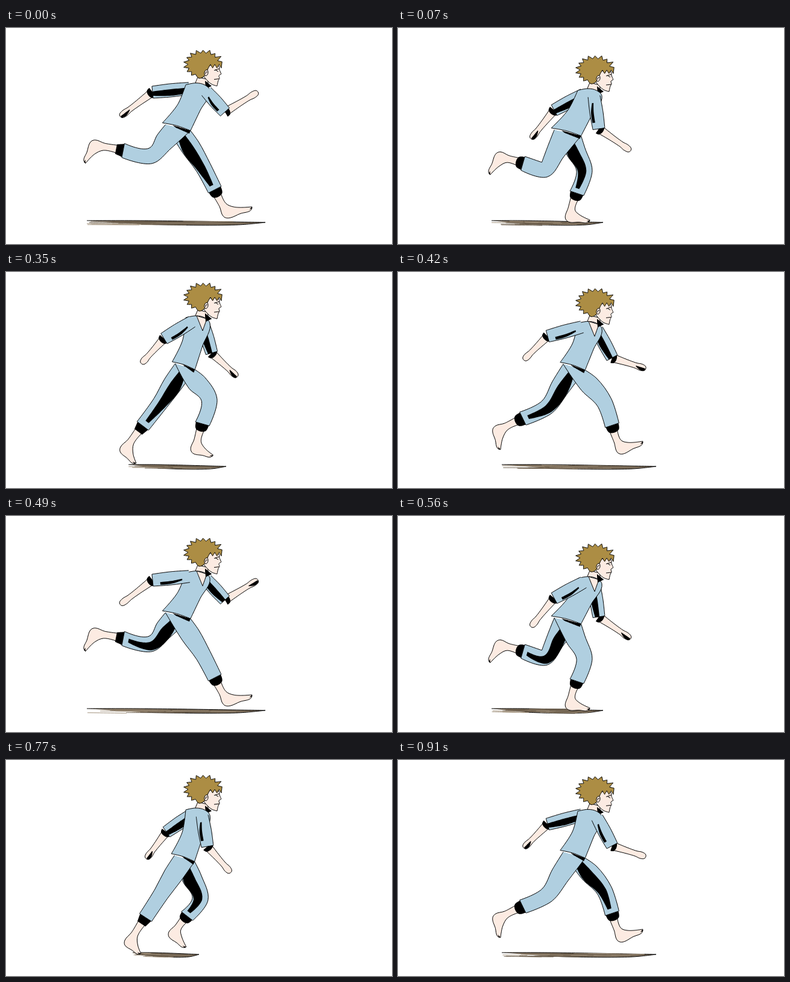
Recreate the animation shown at these times as an HTML page with a canvas. Size 640 px wide and 360 px high, loop 0.98 s.

```html
<!DOCTYPE html>
<html lang="en">
<head>
<meta charset="utf-8">
<title>Run cycle</title>
<style>
html, body { margin: 0; height: 100%; overflow: hidden; background: #fff; }
canvas { display: block; }
</style>
</head>
<body>
<canvas id="stage" width="640" height="360"></canvas>
<script>
const ctx = document.getElementById('stage').getContext('2d');
const CLOTH = '#b0cfe0', SKIN = '#fcebe2', HAIR = '#ac8d44', INK = '#000';
const STEP = 70, CYCLE = 14, HALF = 7;

const points = s => s.split(' ').map(p => p.split(',').map(Number));
const mix = (p, q, k = 0.5) => [p[0] + (q[0] - p[0]) * k, p[1] + (q[1] - p[1]) * k];
const add = (p, x, y) => [p[0] + x, p[1] + y];
const unit = (p, q) => {
  const d = Math.hypot(q[0] - p[0], q[1] - p[1]) || 1;
  return [(q[0] - p[0]) / d, (q[1] - p[1]) / d];
};
const randomizer = seed => () => (seed = (seed * 16807 + 11) % 2147483647) / 2147483647;

// Joint paths of one limb; the passing steps 2 and 9 lie between their neighbours
const joints = {
  knee: points('240,213 243,236 315,238 322,232 337,213 342,217 327,232 309,238 305,235 258,222 256,218 247,225'),
  ankle: points('152,196 174,216 257,274 280,286 315,290 367,291 364,304 285,310 284,308 207,300 200,292 170,262'),
  toe: points('131,225 152,244 265,305 298,312 343,306 406,283 408,299 318,321 310,321 223,323 215,319 169,296'),
  elbow: points('363,140 333,168 266,140 266,120 262,111 248,107 243,107 259,137 317,160 334,144 341,135 355,143'),
  hand: points('417,107 385,204 244,195 233,164 225,152 209,146 190,147 221,184 354,192 372,187 383,174 410,161')
};

function joint(name, phase) {
  const t = phase % CYCLE;
  if (t % HALF === 2) return mix(joint(name, t - 1), joint(name, t + 1));
  return joints[name][t - (t > 2) - (t > 9)];
}

// The head rises for four steps and drops for three
function headHeight(t) {
  return t >= 1 && t <= 5 ? 16 - 7 * t : -19 + 28 / 3 * ((t + 2) % HALF);
}

function torso(step) {
  const t = step % HALF;
  const wave = peak => Math.cos(2 * Math.PI * (t - peak) / HALF);
  const hipY = 172.5 + 10.5 * wave(1.9), lean = wave(4.65);
  return { top: headHeight(t), back: [265 + 11 * lean, hipY - 13], front: [308.5 + 5 * lean, hipY] };
}

// Points beside a chain of joints; side 1 is the back, -1 the front
const beside = (chain, widths, side) => chain.map((p, i) => {
  const d = unit(chain[i - 1] || p, chain[i + 1] || p), w = widths[i] * side;
  return [p[0] - d[1] * w, p[1] + d[0] * w];
});
const tube = (chain, widths, a = 1, b = -1) =>
  [...beside(chain, widths, a), ...beside(chain, widths, b).reverse()];

// Smooth line through the points that keeps sharp corners
function trace(poly) {
  const path = new Path2D();
  const tangents = poly.map((p, i) => {
    if (!i || i === poly.length - 1) return [0, 0];
    const u = unit(poly[i - 1], p), v = unit(p, poly[i + 1]);
    return u[0] * v[0] + u[1] * v[1] < 0.25 ? [0, 0] : unit([0, 0], add(u, ...v));
  });
  path.moveTo(...poly[0]);
  for (let i = 1; i < poly.length; i++) {
    const p = poly[i - 1], q = poly[i], s = tangents[i - 1], t = tangents[i];
    const k = Math.hypot(q[0] - p[0], q[1] - p[1]) / 3;
    path.bezierCurveTo(p[0] + s[0] * k, p[1] + s[1] * k, q[0] - t[0] * k, q[1] - t[1] * k, ...q);
  }
  return path;
}

function shape(poly, color, closed) {
  const path = trace(closed ? [...poly, poly[0]] : poly);
  ctx.fillStyle = color;
  ctx.fill(path);
  if (color !== INK) ctx.stroke(path);
}

// Black on the side of a limb that faces the body
function shade(chain, widths, reach) {
  const side = chain.at(-1)[0] > chain[0][0] ? 1 : -1;
  shape(tube(chain, widths, side, side * reach), INK);
}

function drawArm(phase, body, far) {
  const elbow = joint('elbow', phase), hand = joint('hand', phase);
  const swing = (elbow[0] - 243) / 120;
  const shoulder = [304 + 28 * swing, 101 + 5 * swing + body.top];
  const sleeve = [shoulder, mix(shoulder, elbow), elbow];
  const forearm = [elbow, mix(elbow, hand, 0.72), mix(elbow, hand, 0.88), hand];
  shape(tube(forearm, [7, 4.5, 5.5, 3]), SKIN);
  if (far) shade(forearm.slice(1), [1, 5, 3], 0);
  shape(tube([elbow, mix(elbow, hand, 0.1)], [9, 7]), INK);
  shape(tube(sleeve, [10, 11, 10]), CLOTH);
  if (far) shade(sleeve, [7, 9, 6], -0.2);
  else shade([mix(shoulder, elbow, 0.2), mix(shoulder, elbow, 0.5), mix(shoulder, elbow, 0.8)], [5, 9, 9], 0.5);
}

function drawLeg(phase, body, far) {
  const [knee, ankle, toe] = ['knee', 'ankle', 'toe'].map(name => joint(name, phase));
  const hip = mix(body.back, body.front, 0.55), hem = mix(knee, ankle, 0.52);
  const waistBack = add(body.back, 5, 3);

  const [x, y] = unit(ankle, toe);
  const foot = (along, down) => add(ankle, x * along - y * down, y * along + x * down);
  const length = Math.hypot(toe[0] - ankle[0], toe[1] - ankle[1]);
  const shin = [hem, mix(hem, ankle, 0.75)];
  shape([
    ...beside(shin, [8, 6], 1),
    foot(-5, 9), foot(1, 13), foot(length * 0.55, 8), foot(length - 2, 4), foot(length, -1), foot(15, -4),
    ...beside(shin, [8, 6], -1).reverse()
  ], SKIN);
  shape([foot(length - 5, 3), foot(length, 2), foot(length, -1)], INK);

  shape(tube([hem, mix(hem, ankle, 0.28)], [11, 8]), INK);
  const chain = [hip, mix(hip, knee), knee, hem], widths = [16, 16, 13, 12];
  const outline = tube(chain, widths);
  shape([waistBack, ...outline.slice(1, -1), body.front], CLOTH);
  if (far) shade([hip, mix(hip, knee), knee, mix(knee, hem, 0.8)], [4, 15, 11, 5], -0.3);
}

function drawBody({ top, back, front }) {
  const shoulderBack = [298, 95 + top], shoulderFront = [338, 104 + top];
  shape([
    shoulderBack, [315, 92 + top], [329, 95 + top], shoulderFront,
    mix(shoulderFront, front), front, add(mix(back, front), 0, -2), back,
    add(mix(back, shoulderBack), 6, 1)
  ], CLOTH, true);
  shape([add(back, 17, 4), front, add(front, -2, 5), add(back, 22, 8)], INK);
}

function drawShadow(from, to, random) {
  const w = to - from;
  shape([[from, 321], [from + w * 0.3, 321], [to, 324], [from + w * 0.85, 328], [from + w * 0.3, 327]], '#7b6c59');
  for (let i = 0; i < 16; i++) {
    const x = from + random() * w * 0.6, y = 321.5 + random() * 6.5;
    ctx.strokeStyle = i % 3 ? '#6a5c4a' : '#a0907a';
    ctx.stroke(trace([[x, y], [x + w * (0.15 + random() * 0.25), y + random() * 1.5]]));
  }
  ctx.strokeStyle = INK;
}

const face = points('328,72 340,62 353,64 354,70 357,77 353,80 354,84 352,88 350,97 341,94 333,87 328,80');
const neck = points('318,82 334,86 334,99 324,102 313,94');
const chinShade = points('330,88 341,97 331,102');
const collar = points('316,92 326,117 333,97');

function hairOutline() {
  const random = randomizer(8), outline = [], spikes = 12;
  const around = (angle, r) => [327 + 33 * r * Math.cos(angle), 61 + 25 * r * Math.sin(angle)];
  for (let i = 0; i < spikes; i++) {
    const angle = 2.1 + i * 0.35;
    outline.push(around(angle, 0.76), around(angle + 0.15, 0.94 + random() * 0.12));
  }
  for (let i = 0; i < 7; i++) outline.push([357 - i * 3.6, i % 2 ? 61 : 67]);
  return [...outline, [329, 80], [320, 84]];
}
const hair = hairOutline();

function drawHead() {
  shape(face, SKIN, true);
  shape(hair, HAIR, true);
  ctx.fillStyle = SKIN;
  ctx.beginPath();
  ctx.ellipse(332, 75, 3, 5, 0.2, 0, 7);
  ctx.fill();
  ctx.stroke();
  ctx.stroke(new Path2D('M331 77Q331 72 334 74M345 71L354 68M347 70L352 73M345 86L353 85'));
}

function atHead(y, draw) {
  ctx.save();
  ctx.translate(0, y);
  draw();
  ctx.restore();
}

function drawNeck(part) {
  shape(part, SKIN, true);
  shape(chinShade, INK);
}

function draw() {
  const step = Math.floor(performance.now() / STEP) % CYCLE, opposite = step + HALF;
  const body = torso(step);
  ctx.fillStyle = '#fff';
  ctx.fillRect(0, 0, 640, 360);
  ctx.strokeStyle = INK;
  ctx.lineWidth = 1;
  ctx.lineJoin = 'round';

  const feet = [step, opposite].flatMap(t => [joint('ankle', t)[0], joint('toe', t)[0]]);
  drawShadow(Math.min(...feet) + 3, Math.max(...feet) + 22, randomizer(step * 97 + 5));
  drawArm(opposite, body, true);
  drawLeg(opposite, body, true);
  drawLeg(step, body);
  atHead(body.top, () => drawNeck(neck));
  drawBody(body);
  drawArm(step, body);
  atHead(body.top, () => {
    if (joint('elbow', step)[0] < 300) drawNeck(collar);
    drawHead();
  });
  requestAnimationFrame(draw);
}
draw();
</script>
</body>
</html>
```
